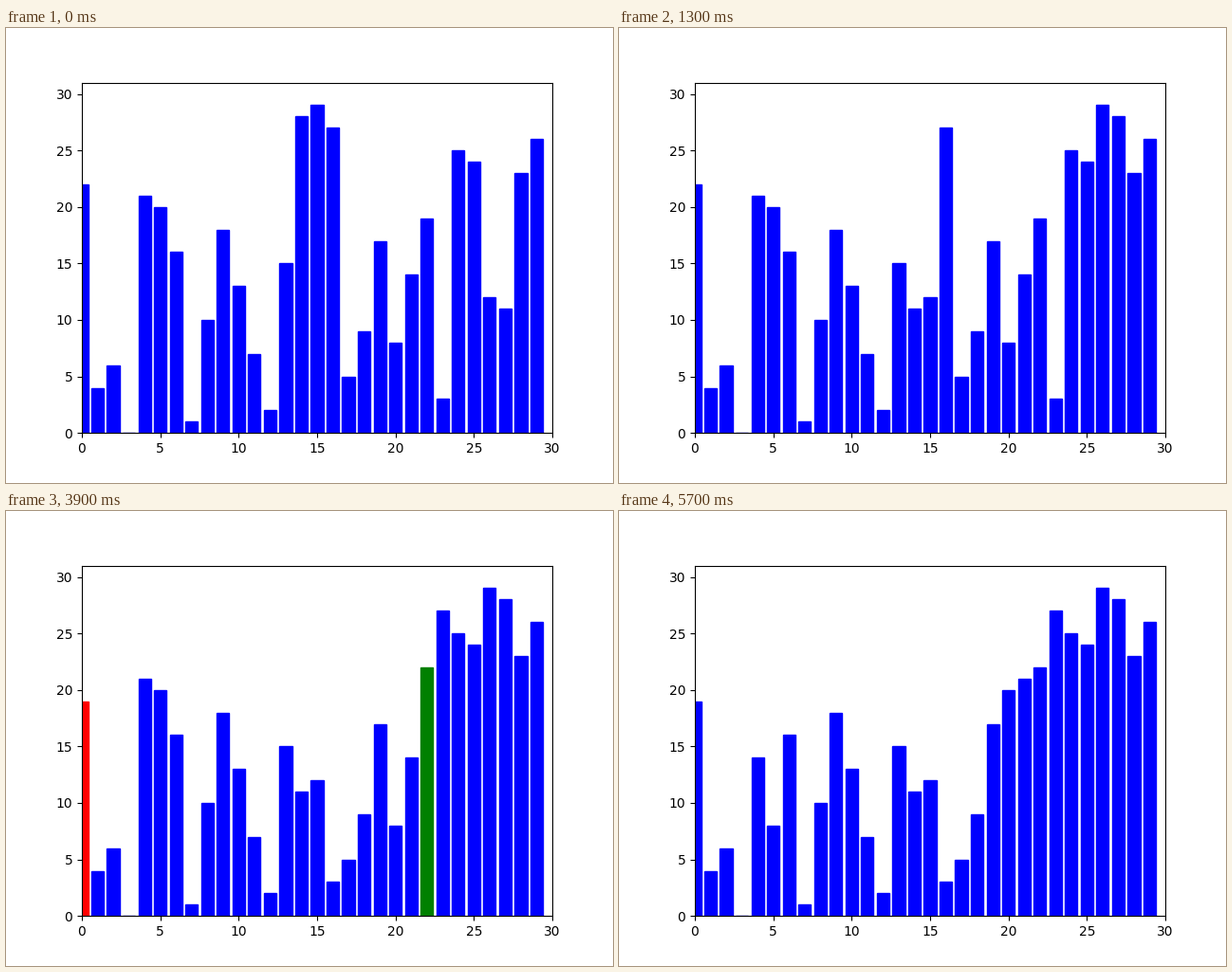
A matplotlib script for the animation above (8 s loop, 640 px wide and 480 px high).

```python
from itertools import islice

import matplotlib.pyplot as plt
from matplotlib.animation import FuncAnimation

STEP = 100     # ms per frame
LOOP = 8000    # ms per loop
TICK = 200     # ms per step of the sort
BEGIN = 2700   # ms of sorting already done when the loop starts

HEIGHTS = [22, 4, 6, 0, 21, 20, 16, 1, 10, 18, 13, 7, 2, 15, 28,
           29, 27, 5, 9, 17, 8, 14, 19, 3, 25, 24, 12, 11, 23, 26]


def quicksort(a, lo, hi):
    """Sort a in place; yield (heights, swapped pair) after each step."""
    if lo >= hi:
        return

    def swap(m, n):
        a[m], a[n] = a[n], a[m]
        return a[:], (m, n)

    pivot, i, j = a[lo], lo, hi
    while i < j:
        while i < hi and a[i] <= pivot:
            i += 1
            yield a[:], ()
        while a[j] > pivot:
            j -= 1
            yield a[:], ()
        if i < j:
            yield swap(i, j)
    yield swap(lo, j)
    yield from quicksort(a, lo, j - 1)
    yield from quicksort(a, j + 1, hi)


steps = list(islice(quicksort(HEIGHTS[:], 0, len(HEIGHTS) - 1),
                    (BEGIN + LOOP) // TICK + 1))

fig, ax = plt.subplots(figsize=(6.4, 4.8), dpi=100)
bars = ax.bar(range(len(HEIGHTS)), HEIGHTS, linewidth=1)
ax.set(xlim=(0, 30), ylim=(0, 31))


def update(frame):
    heights, pair = steps[(BEGIN + frame * STEP) // TICK]
    for bar, height in zip(bars, heights):
        bar.set_height(height)
        bar.set_color("blue")
    for k, color in zip(pair, ("red", "green")):
        bars[k].set_color(color)
    return bars.patches


anim = FuncAnimation(fig, update, frames=LOOP // STEP, interval=STEP,
                     repeat=True, repeat_delay=0, blit=False)
plt.show()
```
